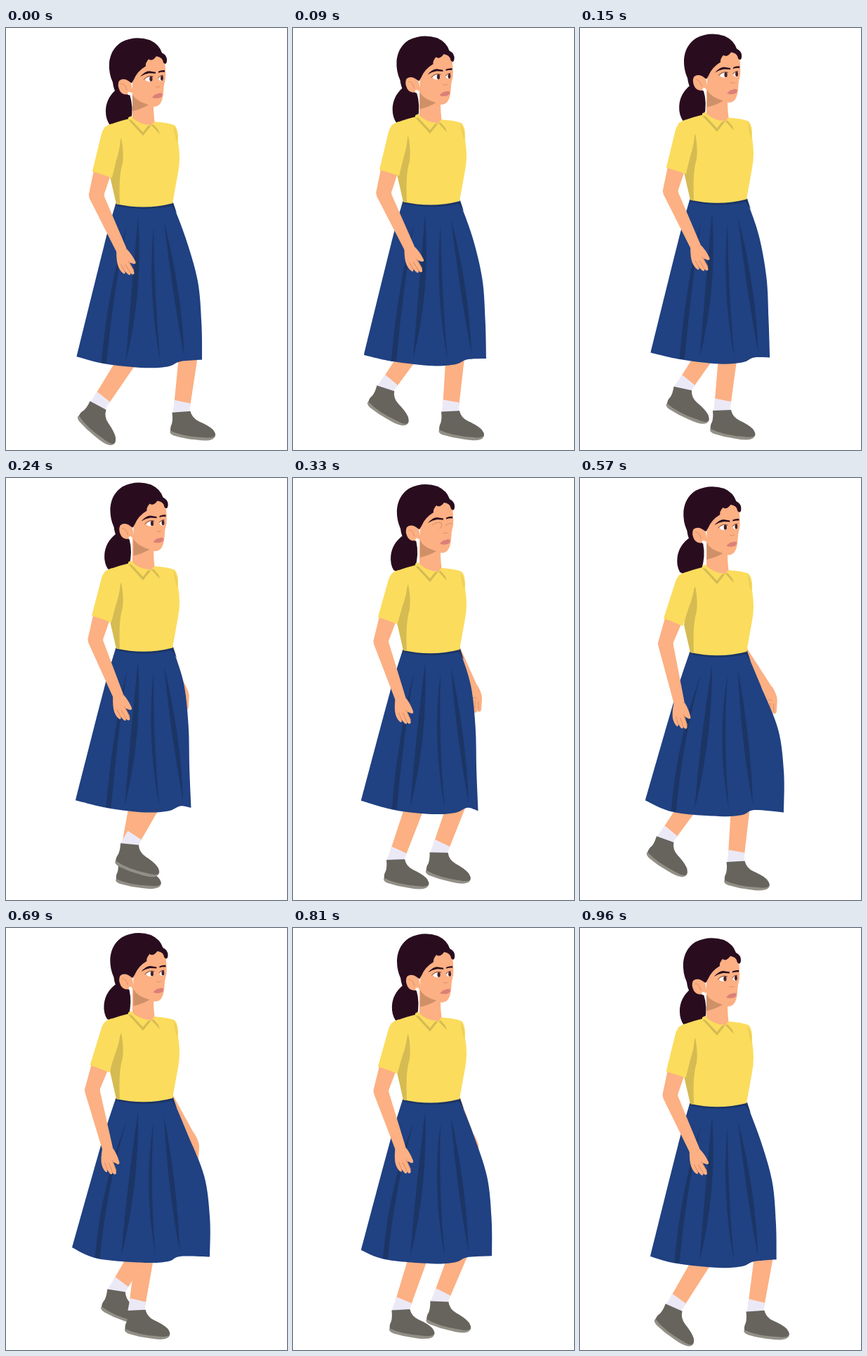
An HTML page that plays this animation: 400 px wide and 600 px high, repeating every 990 ms.

```html
<!DOCTYPE html>
<html lang="en">
<head>
<meta charset="utf-8">
<title>Walk cycle</title>
<style>
  html, body { margin: 0; width: 100%; height: 100%; overflow: hidden; background: #fff; }
  svg { display: block; width: 100%; height: 100%; }
  .skin { fill: #fcb083; }
  .hair { fill: #290d1f; }
  .yellow { fill: #fbdc5d; }
  .olive { fill: #d5bb52; }
  .blue { fill: #204182; }
  .navy { fill: #1b3565; }
  .crease { fill: none; stroke: #dc8f65; stroke-width: 1; stroke-linecap: round; }
</style>
</head>
<body>
<svg viewBox="0 0 400 600" xmlns="http://www.w3.org/2000/svg">
  <defs>
    <g id="calf">
      <path class="skin" d="M-11.5 -10L11.5 -10L13 -65L14 -95L-14 -95L-13 -65Z"/>
      <path fill="#ece9f7" d="M-11.5 -16L11.5 -14L12 4L-12 4Z"/>
    </g>
    <g id="shoe">
      <path fill="#928f86" d="M-15 20L-17 28Q-16 31 -11 33Q4 38 20 40Q36 43 43 40Q49 37 47 31Z"/>
      <path fill="#67645e" d="M-13 0L13 -1Q15 9 25 14Q38 20 44 26Q48 31 47 35Q44 39 31 37Q2 35 -16 26Q-17 21 -14 16Q-12 10 -13 0Z"/>
    </g>
  </defs>
  <g id="farArm" class="skin">
    <path id="farLimb"/>
    <g id="farHand">
      <path d="M-8 -4L6 -6Q13 6 13 13L12 29Q10 35 7 31Q3 37 0 31L-4 15Z"/>
      <path class="crease" d="M3 17L3 27M8 18L8 29M-1 14Q3 10 6 14"/>
    </g>
  </g>
  <g id="farLeg"><use href="#calf"/><use href="#shoe"/></g>
  <g id="nearLeg"><use href="#calf"/><use href="#shoe"/></g>
  <g id="body">
    <path id="skirt" class="blue"/>
    <path id="pleats" class="navy"/>
    <path class="navy" d="M156 249Q198 260 237 248L238 252Q198 262 156 252ZM234 250L238 248L243 263Z"/>
    <path id="tail" class="hair" d="M157 87Q142 100 142 118Q142 130 148 138Q166 146 178 132Q182 112 176 94L168 80Z"/>
    <path class="skin" d="M180 90L180 128L193 142L207 140L212 136Q210 124 210 108Z"/>
    <g id="head">
      <path class="skin" d="M180 68L202 38L225 42Q228 60 227 72Q224 82 224 92Q223 103 219 108Q214 113 207 111Q192 108 180 98Z"/>
      <path fill="#cf9068" d="M180 94Q185 104 203 109Q193 115 180 118Z"/>
      <path class="hair" d="M158 94Q153 87 152 77Q146 64 147 49Q149 30 164 20Q184 10 205 17Q218 23 222 35Q230 39 229 47Q228 53 224 49Q223 41 214 40Q208 48 203 44Q198 50 199 54Q187 61 182 73L179 78L167 73Z"/>
      <path class="skin" d="M178 78Q168 69 161 75Q158 81 162 89Q166 96 175 94L181 91Z"/>
      <path class="crease" d="M164 79Q169 78 172 88"/>
      <circle cx="175.5" cy="93" r="2.4" fill="#fff"/>
      <path class="hair" d="M191 69Q198 61 204 61L213 62.5L213 64.5L204 64Q197 65 191 69ZM217 61.5Q221 59.5 226 60L226 62.5Q221 62 217 63.5Z"/>
      <g id="eyes">
        <path fill="#fff" d="M198 73Q203 67 209 70Q210 76 204 76Q200 76 198 73ZM217 72Q219 68 224 68Q225 74 222 75Q218 75 217 72Z"/>
        <ellipse cx="206.5" cy="72" rx="2.2" ry="3.6" fill="#4a222a"/>
        <ellipse cx="222" cy="71" rx="2" ry="3.6" fill="#4a222a"/>
        <path d="M196 73Q203 66 210 69M216.500 71Q219 67 224 67" fill="none" stroke="#6b3d3a" stroke-width=".9"/>
      </g>
      <path id="lids" class="crease" d="M197 72Q203 67 210 69Q212 73 208 77M216 73Q219 69 225 70"/>
      <path class="crease" d="M213 83Q215 85 219 83"/>
      <path fill="#db8079" d="M208 98.500Q213 93 216 93.500Q219 91.500 222.500 93Q223.500 97 220 98.500Q214 101 208 98.500Z"/>
    </g>
    <path class="yellow" d="M174 127L178 125Q188 137 207 138L211 133Q230 134 240 138Q246 144 245 162Q249 185 245 205L237 249Q198 259 157 250L149 211L140 141Q150 135 174 129Z"/>
    <path class="olive" d="M239 139Q245 148 244 163Q239 151 239 139Z" opacity=".35"/>
    <path class="olive" d="M174 130L195 153L207 138L202 139L195 148L179 131ZM207 138L219 151L217 145L210 137Z"/>
    <path class="olive" d="M164 156Q168 175 166 192Q160 210 162 251L157 250L148 211L154 180Z"/>
    <path id="arm" class="skin"/>
    <g id="hand" class="skin">
      <path d="M-8 -1Q-8 15 -5 22Q-2 29 3 32Q6 32 4 28L9 33Q13 35 12 31L15 33Q19 33 17 28L11 16L17 18Q21 18 19 14Q14 4 7 -3Z"/>
      <path class="crease" d="M-1 19L4 28M5 19L12 30M9 14L17 27"/>
    </g>
    <path id="sleeve" class="yellow" d="M150 136Q139 139 136 150L123 204Q137 208 151 213L157 188Q163 170 163 155L166 140Z"/>
  </g>
</svg>
<script>
const LOOP = 990, STEP = 30;
const DEG = 180 / Math.PI;
const $ = id => document.getElementById(id);
const set = (id, name, value) => $(id).setAttribute(name, value);
const place = (x, y, turn = 0) => `translate(${x} ${y}) rotate(${turn})`;
const move = (id, ...at) => set(id, "transform", place(...at));

// Swings between -1 and 1, highest at the given time, n times per loop.
const wave = (t, peak, n = 1) => Math.cos(2 * Math.PI * n * (t - peak) / LOOP);

// One stride: time, ankle x, ankle y, shoe turn.
const STRIDE = [
  [150, 202, 544, 0],   // foot flat
  [330, 146, 543, 0],   // heel about to rise
  [495, 123, 537, 30],  // push off
  [570, 121, 514, 22],  // lifted
  [690, 157, 516, 11],  // passing
  [815, 210, 532, 4],   // reaching
  [980, 250, 546, -2]   // heel strike
];

// Periodic cubic curve through the stride poses.
function stride(time) {
  const t = time % LOOP, n = STRIDE.length;
  const key = i => STRIDE[(i + n) % n].map((v, j) => j ? v : v + Math.floor(i / n) * LOOP);
  const next = STRIDE.findIndex(k => k[0] > t);
  const i = (next < 0 ? n : next) - 1;
  const [a, b, c, d] = [i - 1, i, i + 1, i + 2].map(key);
  const w = c[0] - b[0], u = (t - b[0]) / w;
  return [1, 2, 3].map(j => {
    const p = b[j], q = c[j];
    const m = (q - a[j]) / (c[0] - a[0]) * w;
    const k = (d[j] - p) / (d[0] - b[0]) * w;
    return p + u * (m + u * (3 * (q - p) - 2 * m - k + u * (2 * (p - q) + m + k)));
  });
}

function drawLeg(id, t, reach) {
  const [x, y, turn] = stride(t);
  const ankle = 175 + (x - 175) * reach;
  const lean = 20 + 15 * wave(t, 580);
  const [calf, shoe] = $(id).children;
  calf.setAttribute("transform", place(ankle, y, lean));
  shoe.setAttribute("transform", place(ankle, y, turn));
}

// Smooth path segments through a row of points.
function thru(pts) {
  let out = "";
  for (let i = 0; i < pts.length - 1; i++) {
    const p = pts[i], q = pts[i + 1];
    const a = pts[i - 1] || p, d = pts[i + 2] || q;
    out += `C${p[0] + (q[0] - a[0]) / 6} ${p[1] + (q[1] - a[1]) / 6} `
      + `${q[0] - (d[0] - p[0]) / 6} ${q[1] - (d[1] - p[1]) / 6} ${q[0]} ${q[1]}`;
  }
  return out;
}

const poly = pts => "M" + pts.map(p => p.join(" ")).join("L") + "Z";

// Sliver from a top point to a foot, bowed by two side offsets.
const pleat = (x, y, foot, end, near, far, width = 0) =>
  `M${x} ${y}Q${foot + near} 375 ${foot - width} ${end}`
  + `L${foot + width} ${end}Q${foot + far} 375 ${x} ${y}Z`;

function drawSkirt(t, swing) {
  const flare = 12 * wave(t, 720) + 5 * wave(t, 75, 2);
  const fold = 138 + 8 * wave(t, 220);
  const drift = 4 * swing;
  const back = [97 + drift, 464 + 0.9 * drift];
  const front = [278 + flare, 475 + 4 * wave(t, 430)];
  const left = [[156, 250], [138 + drift * 0.4, 310], back];
  const bottom = [back, [fold, 477], [198, 483], [231, 481], [248, 474], front];
  const right = [front, [277 + flare * 1.1, 420], [272 + flare * 0.85, 360],
                 [256 + flare * 0.2, 300], [237, 249]];
  set("skirt", "d", "M156 250" + thru(left) + thru(bottom) + thru(right) + "Z");
  set("pleats", "d",
    pleat(172, 281, fold, 476, 5, 13, 3.5)
    + pleat(188, 268, 167 + drift, 473, 8, 25)
    + pleat(210, 283, 216 + drift, 474, -18, -9)
    + pleat(225, 275, 250 + drift, 466, -17, -3));
}

function drawArms(t, swing, y) {
  const ex = 125.5 + 3.7 * swing, ey = 238;
  const wx = 154 + 12.5 * swing, wy = 320 - 3 * swing;
  const turn = Math.atan2(155 - ex, ey - 150) - Math.atan2(26, 88);
  const cos = Math.cos(turn), sin = Math.sin(turn);
  const turned = (px, py) => [155 + (px - 155) * cos - (py - 150) * sin,
                              150 + (px - 155) * sin + (py - 150) * cos];
  const aim = Math.atan2(wx - ex, wy - ey);
  const nx = 7.5 * Math.cos(aim), ny = 7.5 * Math.sin(aim);
  set("arm", "d", poly([
    turned(126, 198), [ex - 11, ey - 1], [ex - 10, ey + 4], [wx - nx, wy + ny],
    [wx + nx, wy - ny], [ex + 11, ey + 1], [ex + 11, ey - 2], turned(150, 206)
  ]));
  move("hand", wx, wy, 25 - aim * DEG);
  set("sleeve", "transform", `rotate(${turn * DEG} 155 150)`);

  const fx = 253 - 15 * wave(t, 50), fy = 305;
  move("farArm", 0, y);
  set("farLimb", "d", poly([[218, 235], [235, 240], [fx + 6, fy - 5], [fx - 8, fy - 3]]));
  move("farHand", fx, fy);
}

function draw(t) {
  const bob = -3.7 - 3.9 * wave(t, 235, 2);
  const swing = wave(t, 75);
  move("body", 0, bob);
  move("head", -bob * 0.2, 0);
  set("tail", "transform", `rotate(${3.7 - 3.6 * wave(t, 0)} 165 88)`);
  drawSkirt(t, swing);
  drawArms(t, swing, bob);
  drawLeg("farLeg", t, 1);
  drawLeg("nearLeg", t + LOOP / 2, 0.85);

  const open = Math.min(1, Math.abs(t - 330) / 75);
  set("eyes", "transform", `translate(0 ${72 * (1 - open)}) scale(1 ${open})`);
  set("lids", "opacity", 1 - open);
}

const start = performance.now();
function tick() {
  const t = (performance.now() - start) % LOOP;
  draw(Math.floor(t / STEP) * STEP);
  requestAnimationFrame(tick);
}
tick();
</script>
</body>
</html>
```
